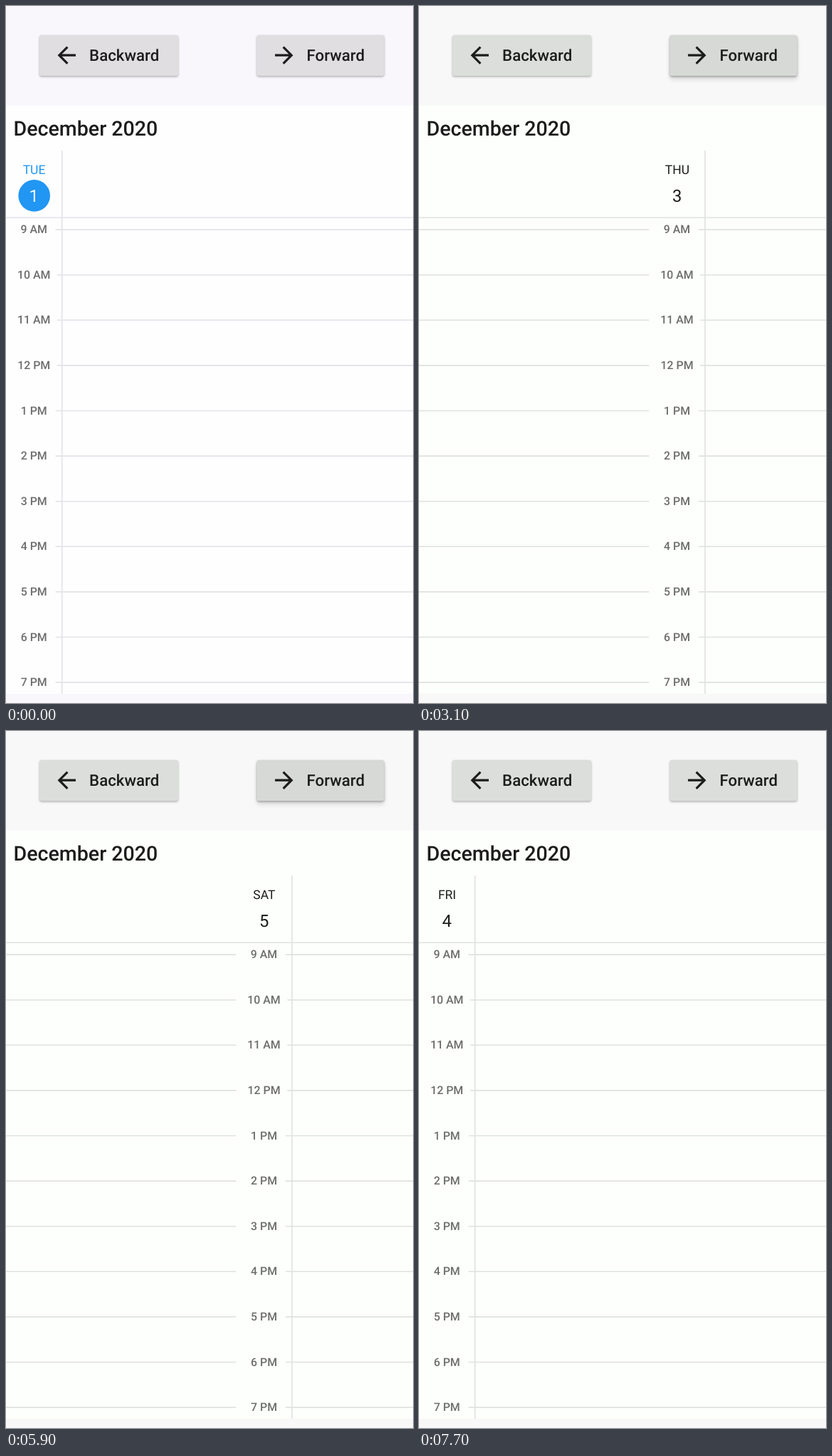
Recreate the animation shown at these times as an HTML page. Size 572x979 px, loop 8 s.

```html
<!DOCTYPE html>
<html lang="en">
<head>
<meta charset="utf-8">
<title>Calendar day view</title>
<style>
  html, body { margin: 0; width: 100%; height: 100%; overflow: hidden; }
  svg { display: block; width: 572px; height: 979px; font-family: Roboto, sans-serif; text-rendering: geometricPrecision; }
  .bar { fill: var(--bar); }
  .sheet { fill: var(--sheet); }
  .key { fill: var(--key); }
  .rule { stroke: var(--rule); stroke-width: 1.6; }
  .ink { fill: #1c1c1c; }
  .title { font-size: 28.6px; font-weight: 500; }
  .label { font-size: 22.26px; font-weight: 500; }
  .hour { font-size: 15.9px; font-weight: 500; fill: #6d6d6d; }
  .day { font-size: 17.5px; }
  .date { font-size: 23.85px; }
  .mid { text-anchor: middle; }
</style>
</head>
<body>
<svg id="stage" viewBox="0 0 572 979">
  <defs>
    <filter id="soft" x="-10%" y="-20%" width="120%" height="150%"><feGaussianBlur stdDeviation="1.4"/></filter>
    <filter id="lifted" x="-10%" y="-20%" width="120%" height="150%"><feGaussianBlur stdDeviation="3"/></filter>
    <clipPath id="view"><rect y="140" width="572" height="826"/></clipPath>
  </defs>
  <rect class="bar" width="572" height="979"/>
  <rect class="sheet" y="139.5" width="572" height="826.5"/>
  <g id="buttons"></g>
  <text class="title ink" x="10.5" y="181.7">December 2020</text>
  <line class="rule" x1="0" x2="572" y1="297.2" y2="297.2"/>
  <g id="pages" clip-path="url(#view)"></g>
</svg>
<script>
const LOOP = 8000, STEP = 100, WIDTH = 572, SLIDE = 500;
const BLUE = '#2196f3';
const DAYS = ['TUE', 'WED', 'THU', 'FRI', 'SAT'];
const HOURS = ['9 AM', '10 AM', '11 AM', '12 PM', '1 PM', '2 PM', '3 PM', '4 PM', '5 PM', '6 PM', '7 PM'];

const MOVES = [
  { start: 1598, from: 0, to: 1 },
  { start: 2969, from: 1, to: 2, press: 2780, button: 1 },
  { start: 4384, from: 2, to: 3, press: 4180, button: 1 },
  { start: 5769, from: 3, to: 4, press: 5580, button: 1 },
  { start: 7169, from: 4, to: 3, press: 7080, button: 0 }
];

const PALETTE = {
  bar: [[249, 247, 251], [247, 248, 247]],
  sheet: [[254, 254, 255], [253, 255, 252]],
  key: [[224, 222, 225], [220, 222, 219]],
  rule: [[226, 226, 232], [224, 226, 223]]
};

const BUTTONS = [
  { x: 47, w: 195, text: 'Backward', icon: 'M20 11H7.83l5.59-5.59L12 4l-8 8 8 8 1.41-1.41L7.83 13H20z' },
  { x: 352.5, w: 179, text: 'Forward', icon: 'M12 4l-1.41 1.41L16.17 11H4v2h12.17l-5.58 5.59L12 20l8-8z' }
];

const byId = id => document.getElementById(id);
const clamp = v => Math.min(1, Math.max(0, v));

function buttonMarkup({ x, w, text, icon }) {
  const box = (y, extra) => `<rect x="${x}" y="${y}" width="${w}" height="57.4" rx="3" ${extra}/>`;
  return `<g>
    ${box(46, 'class="lift" opacity="0" fill-opacity=".28" filter="url(#lifted)"')}
    ${box(42.2, 'fill-opacity=".3" filter="url(#soft)"')}
    ${box(40.7, 'class="key"')}
    ${box(40.7, 'class="splash" opacity="0" fill-opacity=".055"')}
    <path class="ink" d="${icon}" transform="translate(${x + 19.2} 50.1) scale(1.59)"/>
    <text class="label ink" x="${x + 70.1}" y="77.2">${text}</text></g>`;
}

function pageMarkup(day, index) {
  const today = index === 0;
  const hours = HOURS.map((hour, i) => {
    const y = 314.1 + 63.6 * i;
    return `<text class="hour mid" x="39.2" y="${y + 5.1}">${hour}</text>
      <line class="rule" x1="${hour.length > 4 ? 72 : 69.6}" x2="${WIDTH}" y1="${y}" y2="${y}"/>`;
  }).join('');
  return `<g>
    <line class="rule" x1="78.7" x2="78.7" y1="203" y2="966"/>
    ${today ? `<circle cx="39.7" cy="266.4" r="22.3" fill="${BLUE}"/>` : ''}
    <text class="day mid" x="39.5" y="236.2" fill="${today ? BLUE : '#1c1c1c'}">${day}</text>
    <text class="date mid" x="39.3" y="274.6" fill="${today ? '#fff' : '#1c1c1c'}">${index + 1}</text>
    ${hours}</g>`;
}

byId('buttons').innerHTML = BUTTONS.map(buttonMarkup).join('');
byId('pages').innerHTML = DAYS.map(pageMarkup).join('');
const pages = [...byId('pages').children];
const buttons = [...byId('buttons').children];

// cubic-bezier(.25, .1, .25, 1)
function ease(x) {
  if (x <= 0 || x >= 1) return clamp(x);
  const curve = (u, a, b) => 3 * a * u * (1 - u) ** 2 + 3 * b * u * u * (1 - u) + u ** 3;
  let low = 0, high = 1;
  for (let i = 0; i < 24; i++) {
    const u = (low + high) / 2;
    if (curve(u, .25, .25) < x) low = u; else high = u;
  }
  return curve(low, .1, 1);
}

function scrollAt(t) {
  let position = 0;
  for (const { start, from, to } of MOVES) {
    const elapsed = t - start;
    if (elapsed > 40) position = from + (to - from) * ease(elapsed / SLIDE);
  }
  return position;
}

function pressAt(t, button) {
  return Math.max(0, ...MOVES.filter(m => m.button === button).map(({ press, start }) =>
    clamp((t - press) / 150) * clamp(1 - (t - start) / 220)));
}

function render(t) {
  const warm = clamp(t / 400);
  for (const [name, [a, b]] of Object.entries(PALETTE)) {
    const mix = a.map((v, i) => Math.round(v + (b[i] - v) * warm));
    byId('stage').style.setProperty('--' + name, `rgb(${mix})`);
  }
  const position = scrollAt(t);
  pages.forEach((page, i) => {
    const x = (i - position) * WIDTH;
    page.setAttribute('transform', `translate(${x.toFixed(2)} 0)`);
    page.setAttribute('display', Math.abs(x) < WIDTH ? 'inline' : 'none');
  });
  buttons.forEach((button, i) => {
    const amount = pressAt(t, i);
    button.querySelector('.lift').setAttribute('opacity', amount);
    button.querySelector('.splash').setAttribute('opacity', amount);
  });
}

const origin = performance.now();
function tick() {
  // Ten pictures per second, with slack for timer rounding.
  const t = (performance.now() - origin + 5) % LOOP;
  render(Math.floor(t / STEP) * STEP);
  requestAnimationFrame(tick);
}
tick();
</script>
</body>
</html>
```
